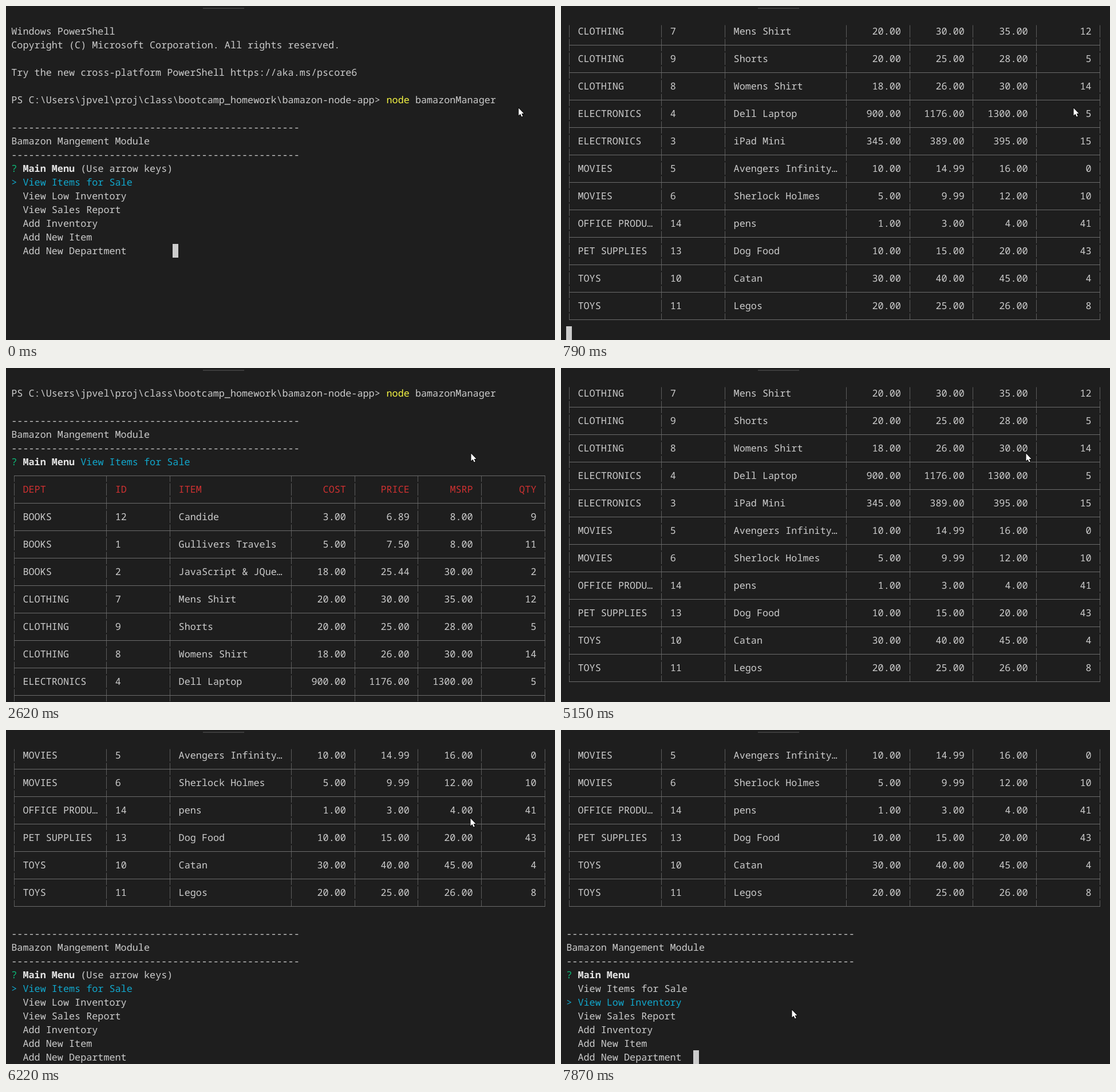
These frames come from a looping animation (959x584 px, 8000 ms). An HTML page with a canvas:

```html
<!DOCTYPE html>
<html lang="en">
<head>
<meta charset="utf-8">
<title>Terminal</title>
<style>
  html, body { margin: 0; width: 959px; height: 584px; overflow: hidden; background: #1e1e1e; }
  canvas { display: block; }
</style>
</head>
<body>
<canvas id="stage" width="959" height="584"></canvas>
<script>
const ctx = document.getElementById('stage').getContext('2d');
const CELL = 10.08, LINE = 24, LEFT = 9.3, TOP = 32, ROWS = 23, LOOP = 8000;
const FG = '#cccccc', WHITE = '#e5e5e5', CYAN = '#11a8cd', GREEN = '#0dbc79',
      YELLOW = '#f5f543', RED = '#cd3131', GRID = '#6c6c6c', GRID_V = '#5c5c5c';

// Character columns of the table rules
const RULES = [0, 16, 27, 48, 59, 70, 81, 92];
const STOCK = `BOOKS|12|Candide|3.00|6.89|8.00|9
BOOKS|1|Gullivers Travels|5.00|7.50|8.00|11
BOOKS|2|JavaScript & JQue…|18.00|25.44|30.00|2
CLOTHING|7|Mens Shirt|20.00|30.00|35.00|12
CLOTHING|9|Shorts|20.00|25.00|28.00|5
CLOTHING|8|Womens Shirt|18.00|26.00|30.00|14
ELECTRONICS|4|Dell Laptop|900.00|1176.00|1300.00|5
ELECTRONICS|3|iPad Mini|345.00|389.00|395.00|15
MOVIES|5|Avengers Infinity…|10.00|14.99|16.00|0
MOVIES|6|Sherlock Holmes|5.00|9.99|12.00|10
OFFICE PRODU…|14|pens|1.00|3.00|4.00|41
PET SUPPLIES|13|Dog Food|10.00|15.00|20.00|43
TOYS|10|Catan|30.00|40.00|45.00|4
TOYS|11|Legos|20.00|25.00|26.00|8`.split('\n');
const MENU = ['View Items for Sale', 'View Low Inventory', 'View Sales Report',
              'Add Inventory', 'Add New Item', 'Add New Department'];

// A line is a list of [text, colour, bold] runs, or a table part
const plain = text => [[text, FG]];
const banner = () => ['-'.repeat(50), 'Bamazon Mangement Module', '-'.repeat(50)].map(plain);
const question = (text, color) => [['? ', GREEN], ['Main Menu', WHITE, true], [' ' + text, color]];
const menu = (picked, hint) => [
  question(hint, FG),
  ...MENU.map((item, i) => i === picked ? [['> ' + item, CYAN]] : plain('  ' + item))
];
const tableRow = (text, color) => ({ cells: text.split('|'), color });
const table = [
  { edge: 'top' }, tableRow('DEPT|ID|ITEM|COST|PRICE|MSRP|QTY', RED),
  ...STOCK.flatMap(row => [{ edge: 'mid' }, tableRow(row, FG)]),
  { edge: 'bottom' }
];
const intro = [
  ...['Windows PowerShell', 'Copyright (C) Microsoft Corporation. All rights reserved.', '',
      'Try the new cross-platform PowerShell https://aka.ms/pscore6', ''].map(plain),
  [['PS C:\\Users\\jpvel\\proj\\class\\bootcamp_homework\\bamazon-node-app> ', FG],
   ['node', YELLOW], [' bamazonManager', FG]],
  [], ...banner()
];
const HINT = '(Use arrow keys)';
const asked = [...intro, ...menu(0, HINT)];
const answered = [...intro, question(MENU[0], CYAN)];
const listed = [...answered, ...table];
const again = [...listed, [], ...banner(), ...menu(0, HINT)];
const moved = [...listed, [], ...banner(), ...menu(1, '')];

// [start, lines, first visible line, cursor column, cursor line]
const VIEWS = [
  [0, asked, 0, 28, 16],
  [580, answered, 0, 0, 11],
  [690, listed, 20, 0, 42],
  [2100, again, 13],
  [2620, again, 5],
  [5150, again, 20],
  [5240, again, 28],
  [6130, again, 30],
  [7870, moved, 30, 22, 52]
];
// [start, x, y]
const POINTER = [
  [0, 895, 178], [2100, 879, 180], [2200, 856, 172], [2320, 832, 160], [2430, 815, 151],
  [2620, 812, 149], [6130, 812, 151], [6220, 811, 154], [6350, 809, 159], [6440, 806, 163],
  [6680, 765, 215], [6780, 570, 370], [6890, 310, 475], [6990, 196, 497],
  [7090, 320, 500], [7200, 403, 489]
];

const at = (steps, t) => steps.findLast(step => step[0] <= t);
const colX = col => LEFT + col * CELL;

function write(text, col, y, color, bold) {
  ctx.font = `${bold ? 'bold ' : ''}16.8px "Noto Sans Mono", monospace`;
  ctx.fillStyle = color;
  ctx.fillText(text, colX(col), y + 18);
}

function drawRules(y, edge) {
  const from = edge === 'top' ? 12 : 1.5, to = edge === 'bottom' ? 12 : 23;
  ctx.fillStyle = GRID_V;
  for (const col of RULES) ctx.fillRect(Math.floor(colX(col + 0.5)), y + from, 1, to - from);
  if (!edge) return;
  ctx.fillStyle = GRID;
  ctx.fillRect(14, y + 12, 928, 1);
}

function drawLine(line, y) {
  if (Array.isArray(line)) {
    let col = 0;
    for (const [text, color, bold] of line) {
      write(text, col, y, color, bold);
      col += text.length;
    }
    return;
  }
  drawRules(y, line.edge);
  line.cells?.forEach((text, i) => {
    const col = i < 3 ? RULES[i] + 2 : RULES[i + 1] - 1 - text.length;
    write(text, col, y, line.color);
  });
}

function drawPointer(x, y) {
  const arrow = new Path2D('M0 0V13L3 10.2L5.2 15L7.2 14.2L5.1 9.5H9Z');
  ctx.save();
  ctx.translate(x + 0.5, y + 0.5);
  ctx.strokeStyle = '#000';
  ctx.lineWidth = 1.5;
  ctx.stroke(arrow);
  ctx.fillStyle = '#fff';
  ctx.fill(arrow);
  ctx.restore();
}

function draw(now) {
  const t = now % LOOP;
  const [, lines, first, cursorCol, cursorLine] = at(VIEWS, t);
  const [, x, y] = at(POINTER, t);
  ctx.textRendering = 'geometricPrecision';
  ctx.fillStyle = '#1e1e1e';
  ctx.fillRect(0, 0, 959, 584);
  ctx.fillStyle = '#3c3c3c';
  ctx.fillRect(344, 3, 72, 2);
  lines.slice(first, first + ROWS).forEach((line, row) => drawLine(line, TOP + row * LINE));
  if (cursorLine) {
    ctx.fillStyle = FG;
    ctx.fillRect(Math.floor(colX(cursorCol)), TOP + (cursorLine - first) * LINE, 10, LINE);
  }
  drawPointer(x, y);
}

const start = performance.now();
(function tick() {
  draw(performance.now() - start);
  requestAnimationFrame(tick);
})();
</script>
</body>
</html>
```
